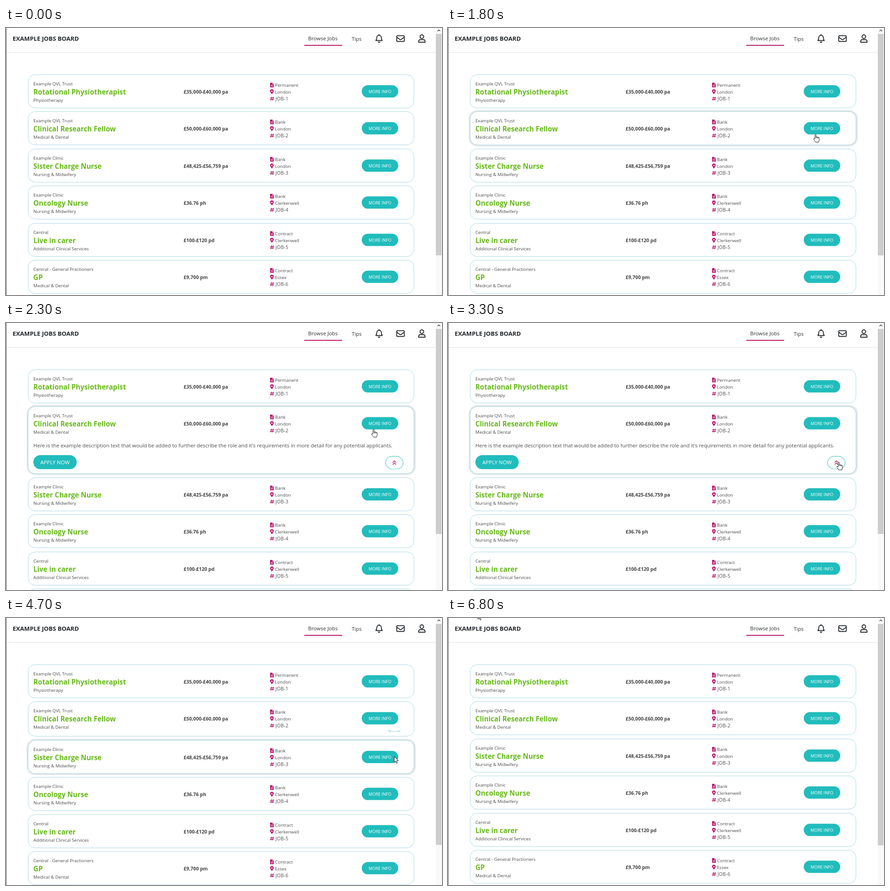
Write an HTML page that moves like this. It is 956x586 px and loops after 6900 ms.

```html
<!DOCTYPE html>
<html lang="en">
<head>
<meta charset="utf-8">
<title>Jobs board</title>
<style>
  html, body { margin: 0; width: 100%; height: 100%; overflow: hidden; background: #fff; }
  svg { display: block; width: 100vw; height: 100vh; }
  text { font-family: "Open Sans", "Noto Sans", sans-serif; fill: #4c4c4c; white-space: pre; }
  .brand { font-size: 13.2px; font-weight: 700; fill: #24282c; }
  .nav { font-size: 11.45px; fill: #2b2f33; }
  .small { font-size: 9.85px; }
  .ref { font-size: 10.3px; letter-spacing: .3px; }
  .title { font-size: 15.2px; font-weight: 700; fill: #67b91a; }
  .pay { font-size: 10.55px; font-weight: 700; fill: #444; }
  .body { font-size: 11.3px; }
  .btn { font-size: 9.2px; fill: #fff; text-anchor: middle; }
  .apply { font-size: 11.5px; fill: #fff; text-anchor: middle; }
  .teal { fill: #21bcbc; }
  .pink { fill: #b9186c; }
  .edge { fill: #fff; stroke: #add8e6; }
  .line { fill: none; stroke: #24282c; stroke-width: 1.9; stroke-linejoin: round; stroke-linecap: round; }
  .mark { fill: none; stroke: #b9186c; stroke-width: 1.4; }
  .cursor { fill: #fff; stroke: #1c1c1c; stroke-width: 1; stroke-linejoin: round; }
</style>
</head>
<body>
<svg viewBox="0 0 956 586" preserveAspectRatio="none">
  <defs><clipPath id="clip"><rect id="window" x="49" y="63.3" width="845" height="0"/></clipPath></defs>
  <rect width="956" height="586" fill="#fff"/>
  <g id="list"></g>

  <rect y="53" width="943" height="1" fill="#dfe2e4"/>
  <text class="brand" x="14.5" y="28.3">EXAMPLE JOBS BOARD</text>
  <text class="nav" x="662.5" y="27.3">Browse Jobs</text>
  <text class="nav" x="758" y="28.3">Tips</text>
  <rect class="pink" x="654" y="37" width="83" height="2"/>
  <path class="line" d="M818 14.5V16M811 27.5Q813 25.3 813 21a5 5 0 0 1 10 0Q823 25.3 825 27.5ZM816.3 30.6a1.8 1.4 0 0 0 3.4 0"/>
  <rect class="line" x="856.7" y="16.9" width="16.6" height="12.6" rx="1.8"/>
  <path class="line" d="M857 20.3l6.3 4.7q1.7 1.2 3.4 0l6.3 -4.7"/>
  <circle class="line" cx="911.8" cy="19" r="4"/>
  <path class="line" d="M904.8 31.3v-1.6q0 -4.2 4.2 -4.2h5.6q4.2 0 4.2 4.2v1.6z"/>

  <rect x="942.5" width="13.5" height="586" fill="#f9f9f9"/>
  <path d="M946.2 7l2.9 -2.9l2.9 2.9" fill="none" stroke="#555" stroke-width="1.6"/>
  <rect id="thumb" x="942.5" y="13" width="12.5" height="486" fill="#cdcdcd"/>
  <rect width="1" height="586" fill="#555"/>

  <path id="arrow" class="cursor" d="M.5 .5V13.6L3.4 10.9L5.4 15.6L7.5 14.7L5.5 10.1H9.6Z"/>
  <path id="hand" class="cursor" d="M3.6 10.5V1.7Q3.6 .5 4.8 .5T6 1.7V6.2Q7 5.2 8.2 6.3Q9.4 5.8 10.5 6.9Q13 6.7 13 9V12.5L11.5 17.5H4.8L.8 11.5Q.3 9.6 2 9.8ZM6 6V9M8.3 6.4V9.2M10.6 7V9.4"/>
</svg>
<script>
const LOOP = 6900, STEP = 100, OPEN_CARD = 1, OPEN = 74.4, DETAIL_TOP = 63.3;
const $ = id => document.getElementById(id);

const jobs = [
  ["Example QVL Trust", "Rotational Physiotherapist", "Physiotherapy", "£35,000-£40,000 pa", "Permanent", "London"],
  ["Example QVL Trust", "Clinical Research Fellow", "Medical & Dental", "£50,000-£60,000 pa", "Bank", "London"],
  ["Example Clinic", "Sister Charge Nurse", "Nursing & Midwifery", "£48,425-£56,759 pa", "Bank", "London"],
  ["Example Clinic", "Oncology Nurse", "Nursing & Midwifery", "£36.76 ph", "Bank", "Clerkenwell"],
  ["Central", "Live in carer", "Additional Clinical Services", "£100-£120 pd", "Contract", "Clerkenwell"],
  ["Central - General Practioners", "GP", "Medical & Dental", "£9,700 pm", "Contract", "Essex"]
];
const tops = jobs.map((_, i) => Math.round(101.9 + 81.45 * i));

const text = (cls, x, y, s) =>
  `<text class="${cls}" x="${x}" y="${y}">${s.replace("&", "&amp;")}</text>`;
const pill = (x, y, w, h) =>
  `<rect class="teal" x="${x}" y="${y}" width="${w}" height="${h}" rx="${h / 2}"/>`;

const icons = `
  <path class="pink" d="M579 18H584V21.2H587.3V28.3H579ZM584.7 18L587.3 20.6H584.7Z"/>
  <path d="M580.7 23.3H585.6M580.7 25.6H585.6" stroke="#fff" stroke-width=".9"/>
  <path class="pink" fill-rule="evenodd" d="M583 43.4Q579 38.4 579 36.6a4 4 0 0 1 8 0Q587 38.4 583 43.4ZM581.5 36.7a1.5 1.5 0 0 0 3 0a1.5 1.5 0 0 0 -3 0Z"/>
  <path class="mark" d="M582.3 48.8L580.9 57.2M586 48.8L584.6 57.2M579.6 51.4H587.6M579 54.8H587"/>`;

// Everything in a card is placed relative to the card's top.
const detail = `<g clip-path="url(#clip)">
  ${text("body", 60, 89.5, "Here is the example description text that would be added to further describe the role and it's requirements in more detail for any potential applicants.")}
  ${pill(60, 107, 95, 31)}${text("apply", 107.5, 127.2, "APPLY NOW")}
  <g id="up">
    <rect x="832.2" y="-28.5" width="38.6" height="28" rx="14" fill="#fff" stroke="#21bcbc"/>
    <path class="mark" d="M847.8 -14.8l3.7 -3.7l3.7 3.7M847.8 -10.4l3.7 -3.7l3.7 3.7"/>
  </g></g>`;

$("list").innerHTML = jobs.map(([org, role, field, pay, kind, place], i) => `<g class="card">
  <g class="glow">
    <rect x="45" y="-3" width="854" height="80" rx="19" fill="#eceeef"/>
    <rect x="46.5" y="-1.5" width="850.5" height="77" rx="17.5" fill="#dde4e7"/>
  </g>
  <rect class="edge" x="48.5" y=".5" width="846" height="73" rx="15.5"/>
  ${text("small", 60, 23.6, org)}${text("title", 60, 44, role)}${text("small", 60, 60, field)}
  ${text("pay", 389.5, 42.2, pay)}
  ${icons}
  ${text("small", 589.8, 27, kind)}${text("small", 589.8, 42, place)}${text("ref", 591, 57, "JOB-" + (i + 1))}
  ${pill(780, 23.6, 80, 27)}${text("btn", 820, 41, "MORE INFO")}
  ${i === OPEN_CARD ? detail : ""}
</g>`).join("");

const cards = [...document.querySelectorAll(".card")];
const glows = cards.map(c => c.querySelector(".glow"));
const frame = [...cards[OPEN_CARD].querySelectorAll(".glow rect, .edge")]
  .map(el => ({ el, height: +el.getAttribute("height") }));

// Rows are [time, value...].
const growth = [[0, 0], [2000, 0], [2100, 10.8], [2200, 42], [2300, OPEN], [4300, OPEN],
  [4400, 58], [4500, 26], [4600, 26], [4700, 3], [4800, 0]];
const hover = [[0, -1], [1200, 0], [1500, 1], [4700, 2], [5700, -1]];
const pointer = [
  [0, 0, 0, ""], [300, 24, -6, "arrow"], [800, 576, 167, "arrow"], [900, 576, 167, ""],
  [1400, 640, 165, "arrow"], [1500, 760, 249, "arrow"], [1600, 801, 233, "hand"], [2400, 801, 233, "hand"],
  [2500, 812, 243, "arrow"], [2800, 842, 274, "hand"], [3000, 859, 292, "hand"], [3100, 859, 292, "hand"],
  [3200, 855, 300, "hand"], [3300, 852, 305, "hand"], [4300, 852, 305, "hand"],
  [4400, 856.5, 305.5, "arrow"], [4600, 856.5, 305.5, "arrow"], [4800, 845, 301, "arrow"], [4900, 845, 301, "arrow"],
  [5000, 700, 270, "arrow"], [5300, 89, 160, "arrow"], [5500, 299.5, 115, "arrow"], [5600, 299.5, 115, "arrow"],
  [5800, 300, 333, "arrow"], [6300, 49, 7, "arrow"], [6600, 65, -11, "arrow"]
];

const rowAt = (rows, t) => rows.findLastIndex(r => r[0] <= t);
function lerp(rows, t, col = 1) {
  const i = rowAt(rows, t), a = rows[i], b = rows[i + 1];
  return b ? a[col] + (b[col] - a[col]) * (t - a[0]) / (b[0] - a[0]) : a[col];
}
const move = (el, x, y) => el.setAttribute("transform", `translate(${x} ${y})`);

function draw(ms) {
  const t = Math.floor(ms % LOOP / STEP) * STEP;
  const extra = lerp(growth, t), grown = Math.round(extra);
  const active = hover[rowAt(hover, t)][1];

  cards.forEach((card, i) => {
    move(card, 0, tops[i] + (i > OPEN_CARD ? grown : 0));
    glows[i].style.display = i === active ? "" : "none";
  });
  for (const { el, height } of frame) el.setAttribute("height", height + grown);
  $("window").setAttribute("height", extra);
  move($("up"), 0, DETAIL_TOP + extra + .4);
  $("thumb").setAttribute("height", 486 - Math.round(.483 * extra));

  const shape = pointer[rowAt(pointer, t)][3];
  for (const id of ["arrow", "hand"]) {
    $(id).style.display = id === shape ? "" : "none";
    move($(id), lerp(pointer, t, 1), lerp(pointer, t, 2));
  }
}

const start = performance.now();
function tick() {
  draw(performance.now() - start);
  requestAnimationFrame(tick);
}
tick();
</script>
</body>
</html>
```
